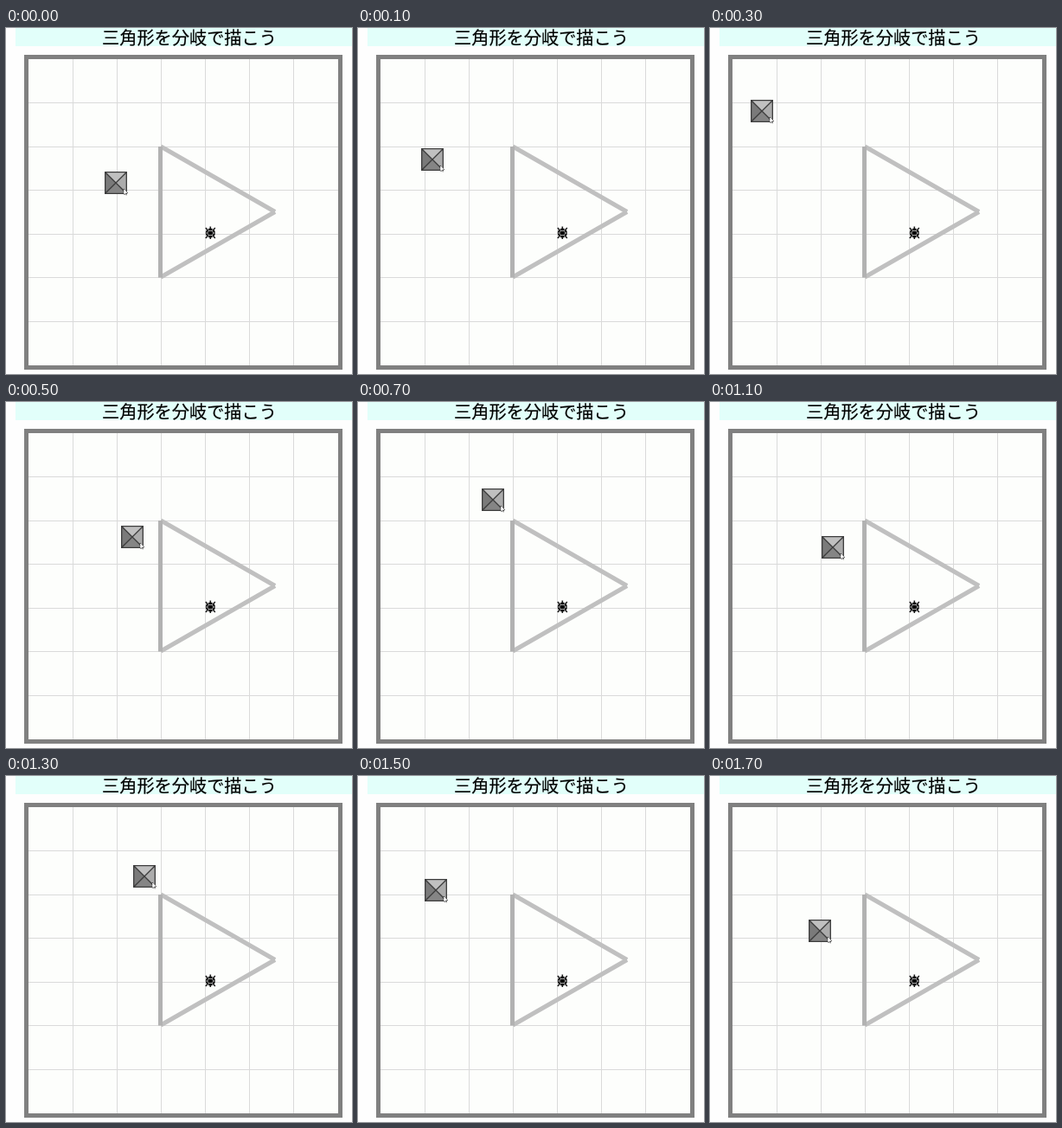
An HTML page for the animation above (2 s loop, 400 by 400 pixels).

```html
<!DOCTYPE html>
<html lang="ja">
<head>
<meta charset="utf-8">
<style>
  html, body { margin: 0; width: 100%; height: 100%; overflow: hidden; background: #fefefe; }
  svg { display: block; width: 100vw; height: 100vh; }
  text { font: 20.2px "Noto Sans CJK JP", "Noto Sans CJK", sans-serif; stroke: #000; stroke-width: .2; }
</style>
</head>
<body>
<svg viewBox="0 0 400 400">
  <rect x="11" width="389" height="21" fill="#e2fffa"/>
  <text x="111" y="18.5">三角形を分岐で描こう</text>

  <rect x="23.5" y="33.5" width="363" height="359" fill="#fdfefc"/>
  <path id="grid" stroke="#dadada"/>
  <rect x="23.5" y="33.5" width="363" height="359" fill="none" stroke="#808080" stroke-width="5"/>
  <g stroke="#c0c0c0" stroke-width="5">
    <path d="M179 137L311 212.5M311 212.5L179 288"/>
    <path d="M178.5 137V288.5" stroke="#b2b2b2"/>
  </g>

  <g transform="translate(236.3 237)">
    <path d="M-5.5 -6L5.5 6M5.5 -6L-5.5 6M0 -7.5V7" stroke="#222" stroke-width="1.6"/>
    <ellipse rx="5.6" ry="5.4"/>
    <path d="M-2 -2.5H2L3.5 0L2 2.5H-2L-3.5 0ZM-6 0H-3.5M3.5 0H6M-2 2.5L-3 5M2 2.5L3 5M-2 -2.5L-3 -5M2 -2.5L3 -5"
      fill="none" stroke="#ccc" stroke-width=".8"/>
  </g>

  <g id="tile">
    <path d="M0 0H26V26H0Z" fill="#858585"/>
    <path d="M0 0H26L13 13Z" fill="#c0c0c0"/>
    <path d="M26 0V26L13 13Z" fill="#acacac"/>
    <path d="M0 0V26L13 13Z" fill="#7a7a7a"/>
    <path d="M.7 .7H25.3V25.3H.7ZL25.3 25.3M25.3 .7L.7 25.3" fill="none" stroke="#3c3c3c" stroke-width="1.3"/>
    <path d="M22 20L27 24.5L24.5 25L25.5 27L24.3 27.4L23.5 25.5L22 26.5Z"
      fill="#fff" stroke="#333" stroke-width=".8" stroke-dasharray="1.2 1"/>
  </g>
</svg>
<script>
  const byId = id => document.getElementById(id);

  let lines = "";
  for (let i = 1; i < 7; i++) {
    lines += `M${Math.floor(26.6 + 50.9 * i) + .5} 36V390M26 ${Math.floor(35.9 + 50.6 * i) + .5}H384`;
  }
  byId("grid").setAttribute("d", lines);

  // The tile is dragged along a smooth closed curve through a few points, then rests
  const STEP = 100, LOOP = 2000, DRAG = 1700;
  const keys = [
    { t: 0, x: 114, y: 166 }, { t: 200, x: 27, y: 100 }, { t: 300, x: 47, y: 83 },
    { t: 500, x: 133, y: 143 }, { t: 700, x: 143, y: 100 }, { t: 900, x: 93, y: 119 },
    { t: 1100, x: 129, y: 155 }, { t: 1300, x: 147, y: 103 }, { t: 1500, x: 77, y: 119 }
  ];

  function key(i) {
    const lap = Math.floor(i / keys.length), k = keys[i - lap * keys.length];
    return { ...k, t: k.t + lap * DRAG };
  }

  function curve(t, axis) {
    let i = 0;
    while (key(i + 1).t <= t) i++;
    const a = key(i), b = key(i + 1), span = b.t - a.t, u = (t - a.t) / span;
    const slope = j => (key(j + 1)[axis] - key(j - 1)[axis]) / (key(j + 1).t - key(j - 1).t) * span;
    const ease = u * u * (3 - 2 * u);
    return a[axis] + (b[axis] - a[axis]) * ease
      + slope(i) * u * (1 - u) ** 2 - slope(i + 1) * u * u * (1 - u);
  }

  function draw() {
    const now = performance.now() % LOOP;
    const t = Math.min(DRAG, Math.floor(now / STEP) * STEP);
    const [x, y] = ["x", "y"].map(axis => Math.round(curve(t, axis)));
    byId("tile").setAttribute("transform", `translate(${x} ${y})`);
    requestAnimationFrame(draw);
  }
  draw();
</script>
</body>
</html>
```
